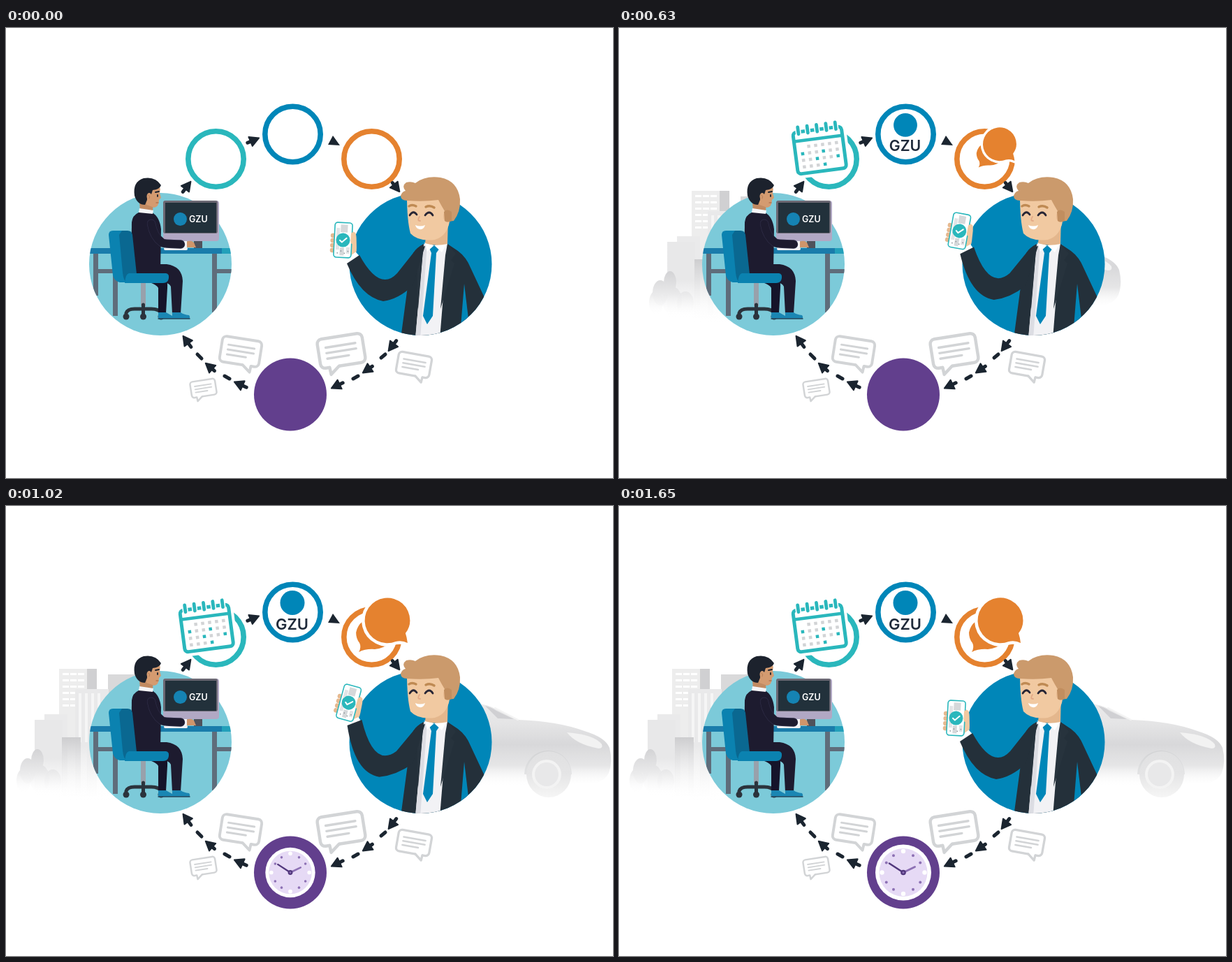
An HTML page with a canvas for the animation above (1.68 s loop, 869 px wide and 644 px high).

```html
<!DOCTYPE html>
<html lang="en">
<head>
<meta charset="utf-8">
<title>Service loop</title>
<style>
html, body { margin: 0; width: 100%; height: 100%; overflow: hidden; background: #fff; }
canvas { display: block; width: 869px; height: 644px; }
</style>
</head>
<body>
<canvas id="stage" width="869" height="644"></canvas>
<script>
const g = document.getElementById('stage').getContext('2d');
const LOOP = 1680, STEP = 30, TAU = Math.PI * 2;
const BLUE = '#0086b8', TEAL = '#2ab7bc', ORANGE = '#e5822f', PURPLE = '#623f8d';
const INK = '#1b2530', GREY = '#d2d4d6', SUIT = '#24303a', NAVY = '#1d1b2f', SKIN = '#f1c9a1';
const NAME = 'GZU';

// Timing
const clamp = v => Math.max(0, Math.min(1, v));
const span = (t, a, b) => clamp((t - a) / (b - a));
const smooth = p => 0.5 - 0.5 * Math.cos(Math.PI * p);
const mix = (a, b, k) => a + (b - a) * k;
function pop(t, start) {
  const p = span(t, start, start + 600);
  return p < 1 ? 1 - 2 ** (-10 * p) : 1;
}

// Drawing helpers
const fill = (color, d) => { g.fillStyle = color; g.fill(new Path2D(d)); };
function line(color, width, d) {
  g.strokeStyle = color;
  g.lineWidth = width;
  g.stroke(new Path2D(d));
}
function rect(color, x, y, w, h, r = 0) {
  g.fillStyle = color;
  g.beginPath();
  g.roundRect(x, y, w, h, r);
  g.fill();
}
function frame(color, width, x, y, w, h, r) {
  g.strokeStyle = color;
  g.lineWidth = width;
  g.beginPath();
  g.roundRect(x, y, w, h, r);
  g.stroke();
}
function disc(color, x, y, rx, ry = rx) {
  g.fillStyle = color;
  g.beginPath();
  g.ellipse(x, y, rx, ry, 0, 0, TAU);
  g.fill();
}
function ring(color, x, y, r, width) {
  g.strokeStyle = color;
  g.lineWidth = width;
  g.beginPath();
  g.arc(x, y, r, 0, TAU);
  g.stroke();
}
function fade(y0, y1, ...stops) {
  const grad = g.createLinearGradient(0, y0, 0, y1);
  stops.forEach((c, i) => grad.addColorStop(i / (stops.length - 1), c));
  return grad;
}
function group(draw, x = 0, y = 0, deg = 0, scale = 1) {
  if (scale <= 0) return;
  g.save();
  g.translate(x, y);
  g.rotate(deg * Math.PI / 180);
  g.scale(scale, scale);
  draw();
  g.restore();
}
function clipTo(build) {
  g.beginPath();
  build();
  g.clip();
}
function label(text, size, color, x, y, align) {
  g.font = `600 ${size}px Inter, sans-serif`;
  g.textAlign = align;
  g.fillStyle = color;
  g.fillText(text, x, y);
}

// Scenery behind the two large circles
const CLEAR = 'rgba(255,255,255,0)';
function tower(x, y, w, color, bottom = 424) {
  rect(fade(y, bottom, color, color, CLEAR), x, y, w, bottom - y);
}
function windows(x, y, cols, rows) {
  for (let r = 0; r < rows; r++)
    for (let c = 0; c < cols; c++) rect('#fff', x + c * 11, y + r * 9, 9, 3);
}
function city(t) {
  const p = span(t, 150, 850);
  if (!p) return;
  group(() => {
    clipTo(() => g.rect(0, 200, 221, 240));
    g.globalAlpha = clamp(p * 2.5);
    g.translate(125 * (1 - smooth(p)), 0);
    tower(146, 241, 46, '#d9d9da');
    tower(76, 233, 41, '#ededed');
    tower(116, 233, 14, '#d0d0d2');
    windows(81, 239, 3, 6);
    tower(99, 262, 48, '#e9e9ea');
    for (let i = 0; i < 4; i++) rect('#f5f5f5', 104 + i * 9, 268, 4, 70);
    tower(55, 298, 33, '#eaeaeb', 415);
    tower(41, 306, 40, '#e8e8e9', 415);
    rect(fade(331, 420, '#cdcdcf', CLEAR), 80, 331, 27, 89);
    const leaf = fade(348, 412, '#d3d3d5', '#e9e9ea', CLEAR);
    disc(leaf, 45, 364, 9, 16);
    disc(leaf, 31, 379, 11, 18);
    disc(leaf, 48, 390, 14, 20);
    disc(leaf, 25, 393, 10, 17);
    disc(leaf, 67, 394, 12, 17);
  });
}
function car(t) {
  const p = span(t, 516, 960);
  if (!p) return;
  group(() => {
    clipTo(() => g.rect(594, 240, 275, 190));
    g.globalAlpha = clamp(p * 6);
    g.translate(-175 * (1 - smooth(p)), 0);
    fill(fade(280, 402, '#eaeaeb', '#e5e5e6', '#d8d8da', '#e6e6e7', CLEAR),
      'M640 283 Q680 280 696 288 L734 306 Q790 308 828 322 Q858 331 864 346 Q869 366 863 382 Q858 393 842 397 L640 402Z');
    fill('#d0d0d3', 'M686 286 Q695 288 702 293 L727 305 L704 304Z');
    line('#f4f4f4', 2, 'M700 289 L733 306');
    fill('#f2f2f2', 'M803 324 Q842 327 853 341 Q855 347 848 347 Q816 341 803 324Z');
    fill(fade(344, 400, '#cecfd1', '#ebebec'), 'M742 384 A34 34 0 0 1 810 384Z');
    disc(fade(350, 418, '#e0e0e1', '#e5e5e6', '#f6f6f6'), 777, 384, 32, 33);
    disc('#f3f3f3', 774, 384, 21);
    disc('#e8e8e9', 774, 384, 17);
  });
}

// Arrows and grey speech bubbles
function arrow(x0, y0, x1, y1) {
  const a = Math.atan2(y1 - y0, x1 - x0), len = Math.hypot(x1 - x0, y1 - y0);
  group(() => {
    line(INK, 5, `M${-len + 2} 0 H-10`);
    fill(INK, 'M-1 0 L-14 -7 V7Z');
    line(INK, 2, 'M-1 0 L-14 -7 V7Z');
  }, x1, y1, a * 180 / Math.PI);
}
function arrows() {
  arrow(252, 236, 265, 219);
  arrow(344, 165, 363, 157);
  arrow(552, 220, 564, 235);
  arrow(346, 515, 326, 506);
  arrow(300, 492, 285, 479);
  arrow(266, 458, 253, 440);
  arrow(560, 446, 547, 463);
  arrow(526, 483, 510, 494);
  arrow(484, 507, 465, 516);
  fill(INK, 'M468 154 L478 168 L461 167Z');
  line(INK, 5, 'M313 498 L320 502 M274 467 L280 473 M537 472 L543 467 M497 502 L504 498');
}
function note(x, y, w, h, deg, side) {
  group(() => {
    const l = w / 2, k = h / 2, u = w / 58;
    frame(GREY, 4 * u, -l, -k, w, h, 6 * u);
    const a = side * l * 0.2, b = side * l * 0.62, tip = side * l * 0.6;
    g.fillStyle = '#fff';
    g.fillRect(Math.min(a, b), k - 3 * u, Math.abs(b - a), 6 * u);
    line(GREY, 4 * u, `M${a} ${k} L${tip} ${k + 9 * u} L${b} ${k}`);
    [-0.38, 0, 0.38].forEach((v, i) =>
      line(GREY, 3 * u, `M${-l * 0.66} ${k * v} H${l * (i < 2 ? 0.66 : 0.3)}`));
  }, x, y, deg);
}
function notes() {
  note(336, 463, 57, 37, 9, 1);
  note(480, 462, 65, 42, -9, -1);
  note(282.5, 515.5, 36, 23, -9, -1);
  note(584, 482, 48, 31, 10, 1);
}

// Desk worker
function worker() {
  disc('#7ccad9', 221, 338, 102);
  group(() => {
    clipTo(() => g.arc(221, 338, 102, 0, TAU));
    const leg = '#5f6d7b';
    rect(leg, 125, 323, 7, 60);
    rect(leg, 131, 345, 24, 6);
    rect(leg, 153, 323, 7, 89);
    rect(leg, 295, 323, 7, 84);
    rect(leg, 302, 345, 22, 6);
    rect('#1a7cab', 119, 315, 190, 8);
    rect('#23a0ba', 309, 315, 15, 8);
  });
  // Monitor
  rect('#4f525c', 269, 304, 12, 11);
  rect('#b1a8c4', 225, 247, 80, 58, 4);
  rect('#6b6873', 225, 247, 78, 47, 3);
  rect('#22313b', 228, 250, 73, 43);
  disc('#1583b3', 249.5, 273.5, 9.5);
  label(NAME, 12.5, '#fff', 262, 278, 'left');
  rect('#f1f1f4', 226, 314, 34, 4, 2);
  // Chair base
  rect('#98a1ab', 193, 364, 7, 34);
  line('#2b333c', 5, 'M172 408 Q174 402 184 402 H208 Q219 402 222 408 M196.5 396 V410');
  [172, 196.5, 222].forEach(x => disc('#2b333c', x, 413, 4.5));
  // Legs and shoes
  fill('#15142a', 'M185 345 L222 348 Q232 355 231 372 L229 408 H218 V372 Q212 362 185 362Z');
  fill('#1a86b3', 'M218 407 H229 L238 412 V416 H218Z');
  fill(NAVY, 'M182 338 H230 Q252 341 253 362 L250 409 H238 L236 370 Q234 364 222 364 H182Z');
  fill('#1a86b3', 'M238 407 H250 Q254 410 262 411 Q264 413 263 416 H238Z');
  line('#26455b', 1.5, 'M218 416 H263');
  // Torso
  fill(NAVY, 'M190 264 L209 264 Q220 270 222 288 L221 350 Q198 354 183 345 Q179 310 180 278 Q181 268 190 264Z');
  // Chair seat
  fill('#0b82b0', 'M153 290 H172 L179 352 L180 364 H163 Q155 362 153 354 L147 296 Q147 290 153 290Z');
  fill('#0a6891', 'M166 290 H174 Q180 290 181 296 L187 352 V364 H172 Q168 360 167 350 L162 296Z');
  fill('#0b82b0', 'M176 351 H229 Q234 352 233 358 Q232 365 225 365 H170 Q171 352 176 351Z');
  // Arm and hand
  fill('#cf956b', 'M257 306 Q266 303 269 307 L272 314 H257Z');
  rect('#f5f5f7', 255, 305, 4, 9);
  line('#2f2d47', 12.5, 'M208 280 Q211 298 223 307 Q226 309 250 309.5');
  line(NAVY, 11, 'M208 280 Q211 298 223 307 Q226 309 250 309.5');
  // Head
  fill('#c18a61', 'M191 248 H211 L210 263 H192Z');
  fill('#f5f5f7', 'M191 258 L211 261 L210 266 L190 264Z');
  fill('#d49b70', 'M199 226 H218 Q222 228 220 236 L222 243 L219 246 Q219 256 212 257 L201 253Z');
  fill('#1c222d', 'M184 240 Q181 220 197 215 Q214 212 222 225 Q220 231 210 232 L208 238 Q201 236 202 246 L199 253 Q188 253 184 240Z');
  disc('#d49b70', 205, 241, 3.5, 5);
  line('#b47c55', 1, 'M204 239 Q207 241 205 244');
  line('#1c222d', 1.8, 'M214 235 L219 234 M217 239 V241');
  line('#a5603f', 1.2, 'M215 250 H218');
}

// Customer with the phone
const ARM = {
  low: [488, 337, 508, 385, 540, 391, 562, 388, 560, 351, 535, 378, 506, 325],
  high: [489, 296, 492, 380, 530, 385, 555, 384, 558, 351, 519, 373, 512, 291]
};
function hand() {
  fill(SKIN, 'M8 -12 Q18 -16 19 -4 L20 10 Q21 18 15 27 L6 25Z');
  fill('#fff', 'M4 28 L19 16 L25 22 L8 35Z');
  [-9, -2, 5, 12].forEach(y => rect('#e6b98f', -18, y, 10, 6.5, 3));
  rect('#fff', -12.5, -25, 25, 50, 4);
  frame(TEAL, 1.6, -12.5, -25, 25, 50, 4);
  rect('#d5d8da', -4, -22, 10, 11);
  rect('#e2e4e6', -10, -17, 5, 31);
  rect('#d5d8da', -4, 11, 6, 11);
  rect('#e2e4e6', 5, 10, 5, 9);
  for (let i = 0; i < 4; i++) rect('#8b9297', -8 + i * 5, 18 - i % 2 * 3, 1.5, 1.5);
  disc(TEAL, 0, 0, 10);
  line('#fff', 2, 'M-4.5 0.5 L-1.5 3 L5 -3');
  rect(SKIN, 11, -12, 7, 17, 3.5);
}
function arm(k) {
  const p = ARM.low.map((v, i) => mix(v, ARM.high[i], k));
  group(hand, mix(482.5, 497, k), mix(303.5, 264.5, k), mix(3, 25, k));
  fill(SUIT, `M${p[0]} ${p[1]} Q${p.slice(2, 6)} Q${p.slice(6, 8)} 582 369 L600 312 Q588 314 583 322 L${p.slice(8, 10)} Q${p.slice(10)}Z`);
}
function customer(t) {
  disc(BLUE, 593.5, 338, 102);
  const k = smooth(span(t, 520, 800)) * (1 - smooth(span(t, 900, 1160)));
  group(() => {
    clipTo(() => { g.rect(440, 200, 250, 138); g.arc(593.5, 338, 102, 0, TAU); });
    fill(SUIT, 'M598 309 H632 L647 319 Q659 328 665 343 L687 390 L650 445 H565 L575 370 L583 322 Q588 314 598 309Z');
    fill(BLUE, 'M656 366 L650 440 L662 416Z');
    fill('#f2f2f5', 'M598 309 H632 L621 445 H586Z');
    fill('#dcdde3', 'M598 309 L603 309 L593 445 H586Z');
    fill('#27333d', 'M632 309 L644 323 L637 332 L642 337 L622 402 L629 325Z');
    fill('#27333d', 'M598 309 L587 322 L592 331 L588 336 L590 402 L596 330Z');
  });
  fill(BLUE, 'M605 313 L613 309 L621 315 L616 322 L611 412 L603 424 L597 412 L609 322Z');
  fill('#fff', 'M599 307 L613 311 L603 320Z M632 307 L613 311 L624 321Z');
  arm(k);
  // Head
  fill('#e4b78d', 'M602 290 L633 272 L632 309 Q615 313 600 308Z');
  fill(SKIN, 'M574 240 L630 236 L636 270 Q634 297 614 303 Q590 306 579 294 Q574 275 574 240Z');
  fill('#cb9a6c', 'M574 247 Q565 247 565 240 Q567 234 572 233 Q566 226 573 221 Q580 219 586 222 Q600 211 622 214 Q647 219 650 245 Q651 263 641 276 L630 277 L628 262 Q622 252 619 246 Q598 249 574 247Z');
  disc('#e9bc92', 632, 270, 6, 8);
  fill('#c18e5f', 'M627 263 Q631 258 638 263 V276 Q632 279 628 276Z');
  line('#bf8a53', 3.4, 'M577 255 Q581 252 587 255 M601 256 Q607 253 613 257');
  line('#282635', 2.8, 'M578 268 Q583 260 588 267 M600 268 Q606 260 611 268');
  line('#e3a986', 1.8, 'M592 270 Q588 276 593 276');
  fill('#fff', 'M586 282 Q593 285 600 282 Q598 289 592 288 Q587 287 586 282Z');
}

// Round icons
function calendar() {
  frame('#fff', 13, -35, -28, 70, 60, 6);
  rect('#fff', -35, -28, 70, 60, 5);
  frame(TEAL, 5, -35, -28, 70, 60, 5);
  line(TEAL, 4.5, 'M-34 -15 H34');
  for (let i = -2; i <= 2; i++) {
    line('#fff', 8, `M${i * 13.5} -34 V-26`);
    line(TEAL, 4.8, `M${i * 13.5} -35 V-25`);
  }
  const marked = [6, 9, 14, 17, 21];
  for (let i = 1; i < 22; i++)
    rect(marked.includes(i) ? TEAL : GREY, -27 + i % 6 * 10, -8 + Math.floor(i / 6) * 9.5, 4.5, 4.5);
}
function emblem() {
  disc(BLUE, 0, -12.5, 17.5);
  label(NAME, 22, '#1f2a3a', -0.5, 26, 'center');
}
function chat() {
  fill(ORANGE, 'M-41 8 A27 27 0 0 1 12 8 Q12 29 -14 32 Q-27 31 -37 36 Q-33 29 -36 23 Q-41 17 -41 8Z');
  const front = 'M36.5 -9 A32.5 32.5 0 1 0 16 21 Q25 19 33 23 Q32 15 30 9 Q36.5 1 36.5 -9Z';
  line('#fff', 9, front);
  fill(ORANGE, front);
}
function clock() {
  disc('#fff', 0, 0, 40);
  disc('#e6daf5', 0, 0, 34.5);
  for (let i = 0; i < 12; i++) {
    const a = i * TAU / 12, major = i % 3 === 0, r = major ? 30.5 : 28;
    disc(major ? '#fff' : '#8d71b4', Math.sin(a) * r, -Math.cos(a) * r, major ? 3.2 : 2);
  }
  line('#8d71b4', 3, 'M0 0 L16.5 -8');
  line('#51377c', 2.6, 'M0 0 L-20 -13');
  disc('#51377c', 0, 0, 3.8);
  disc('#8d71b4', 0, 0, 1.5);
}
function icons(t) {
  ring(TEAL, 300.5, 187.5, 39.7, 7.6);
  ring(BLUE, 410.5, 152, 39.7, 7.6);
  ring(ORANGE, 523.5, 187.5, 39.7, 7.6);
  disc(PURPLE, 407, 524.5, 52);
  group(calendar, 287, 173, -7.5, pop(t, 40));
  group(emblem, 410, 151, 0, pop(t, 335));
  group(chat, 542, 173, 0, pop(t, 514));
  group(clock, 407, 524.5, 0, pop(t, 827));
}

function draw(now) {
  const t = Math.floor(now % LOOP / STEP) * STEP;
  g.fillStyle = '#fff';
  g.fillRect(0, 0, 869, 644);
  g.lineCap = g.lineJoin = 'round';
  city(t);
  car(t);
  icons(t);
  arrows();
  notes();
  worker();
  customer(t);
}
let start;
function tick(now) {
  start ??= now;
  draw(now - start);
  requestAnimationFrame(tick);
}
draw(0);
requestAnimationFrame(tick);
</script>
</body>
</html>
```
